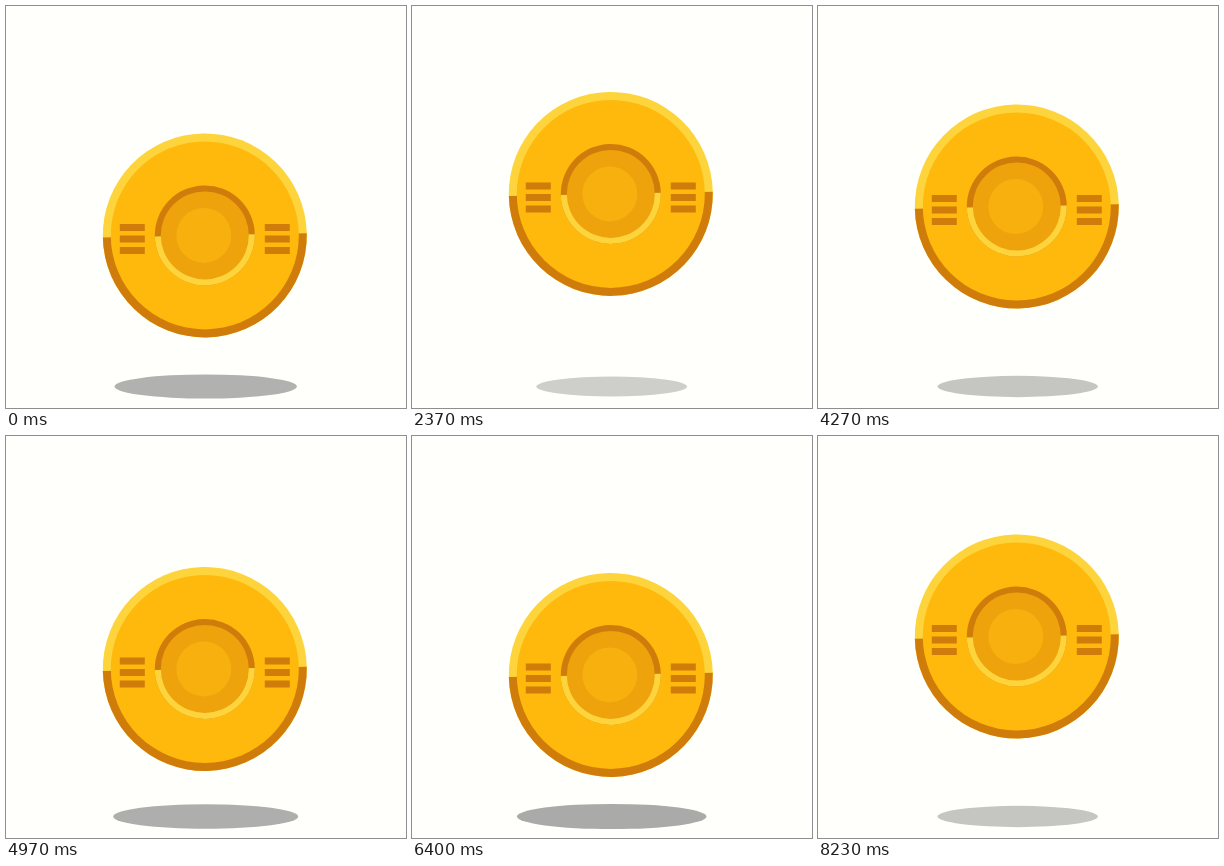
Write an HTML page that moves like this. It is 400 by 402 pixels and loops after 8260 ms.

```html
<!DOCTYPE html>
<html lang="en">
<head>
<meta charset="utf-8">
<title>Floating coin</title>
<style>
  html, body { margin: 0; width: 100%; height: 100%; overflow: hidden; background: #fffffb; }
  svg { display: block; width: 100vw; height: 100vh; }
  .gold { fill: #feb90c; }
  .light { fill: #fdd43c; }
  .dark { fill: #d07c0a; }
  .well { fill: #eea20c; }
  .mark { fill: #f7b00e; }
</style>
</head>
<body>
<svg viewBox="0 0 400 402">
  <ellipse id="shadow" cx="199.7" cy="380.5" rx="91" ry="12"/>
  <g id="coin">
    <g transform="rotate(-1.2)">
      <circle class="light" r="102"/>
      <path class="dark" d="M-102 0A102 102 0 0 0 102 0Z"/>
    </g>
    <circle class="gold" r="94"/>
    <g transform="rotate(-1.2)">
      <circle class="dark" r="50"/>
      <path class="light" d="M-50 0A50 50 0 0 0 50 0Z"/>
    </g>
    <circle class="well" r="44"/>
    <circle class="mark" cx="-1" r="27.5"/>
    <path id="bars" class="dark"/>
  </g>
</svg>
<script>
  const LOOP = 8260;
  const STEP = 1000 / 30;
  const PERIOD = 1500;
  const LOWEST = 250;    // time of the first low point
  const coin = document.getElementById('coin');
  const shadow = document.getElementById('shadow');

  const bar = (x, y) => `M${x} ${y}h25v7h-25z`;
  document.getElementById('bars').setAttribute('d',
    [-85, 60].flatMap(x => [-11.5, 0, 11.5].map(y => bar(x, y))).join(''));

  const mix = (a, b, p) => a + (b - a) * p;

  function draw(now) {
    // steps of 1/30 s; the small offset absorbs rounding to 10 ms
    const t = Math.floor((now % LOOP + 4) / STEP) * STEP;
    const p = (1 + Math.cos((t - LOWEST) / PERIOD * 2 * Math.PI)) / 2; // 1 = low, 0 = high
    const rx = mix(73.6, 97, p);
    coin.setAttribute('transform', `translate(198.8 ${mix(183.2, 244.8, p)})`);
    shadow.setAttribute('rx', rx);
    shadow.setAttribute('ry', rx * 0.133);
    shadow.setAttribute('fill-opacity', mix(0.18, 0.35, p));
  }

  const start = performance.now();
  function tick() {
    draw(performance.now() - start);
    requestAnimationFrame(tick);
  }
  tick();
</script>
</body>
</html>
```
